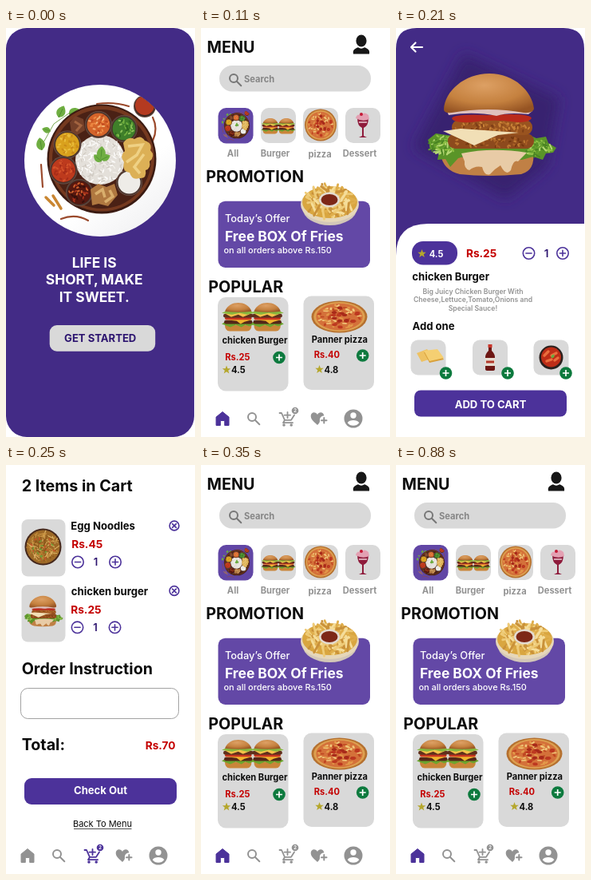
Write an HTML page that moves like this. It is 237 by 512 pixels and loops after 1.2 s.

```html
<!DOCTYPE html>
<html lang="en">
<head>
<meta charset="utf-8">
<title>Food ordering app</title>
<style>
html, body { margin: 0; width: 100%; height: 100%; overflow: hidden; background: #fff; }
svg { display: block; }
text { font-family: Inter, sans-serif; font-weight: 700; fill: #0b0b0b; }
.h1 { font-size: 19.7px; }
.h2 { font-size: 17.4px; }
.h3 { font-size: 13.1px; }
.price { font-size: 13.7px; }
.body { font-size: 11.1px; }
.note { font-size: 8.65px; font-weight: 600; }
.note text { font-weight: 600; }
.mid { text-anchor: middle; }
.grey { fill: #929292; }
.white { fill: #fff; }
.red { fill: #c40000; }
.ink { fill: #2c146f; }
.tile { fill: #d9d9d9; }
.purple { fill: #4c329a; }
.line { fill: none; stroke: currentColor; stroke-width: 1.6; stroke-linecap: round; stroke-linejoin: round; }

.screen { opacity: 0; animation: 1.2s step-end infinite; }
#splash { animation-name: splash; }
#menu { animation-name: menu; }
#detail { animation-name: detail; }
#cart { animation-name: cart; }
@keyframes splash { 0% { opacity: 1 } 4.166% { opacity: 0 } }
@keyframes menu { 0% { opacity: 0 } 4.166% { opacity: 1 } 12.5% { opacity: 0 } 29.166% { opacity: 1 } 100% { opacity: 1 } }
@keyframes detail { 0% { opacity: 0 } 12.5% { opacity: 1 } 20.833% { opacity: 0 } }
@keyframes cart { 0% { opacity: 0 } 20.833% { opacity: 1 } 29.166% { opacity: 0 } }
</style>
</head>
<body>
<svg width="237" height="512" viewBox="0 0 237 512">
<defs>
  <linearGradient id="plateLight" x1=".2" y1=".1" x2=".9" y2="1">
    <stop offset=".6" stop-color="#fff"/><stop offset="1" stop-color="#eeeef0"/>
  </linearGradient>
  <radialGradient id="bun" cx=".45" cy=".3" r=".75">
    <stop offset="0" stop-color="#dda064"/><stop offset=".6" stop-color="#c5813f"/><stop offset="1" stop-color="#965423"/>
  </radialGradient>
  <radialGradient id="bowl"><stop offset=".8" stop-color="#2c1712"/><stop offset="1" stop-color="#6b5248"/></radialGradient>
  <filter id="soft" x="-20%" y="-20%" width="140%" height="140%"><feGaussianBlur stdDeviation="8"/></filter>
  <clipPath id="plateEdge"><circle cx="118" cy="166" r="95"/></clipPath>

  <!-- icons, centred on 0,0 -->
  <path id="star" d="M0-5.4 1.4-1.8 5.2-1.7 2.2.7 3.3 4.4 0 2.2-3.3 4.4-2.2.7-5.2-1.7-1.4-1.8Z" fill="#b5a72c"/>
  <g id="add"><circle r="7.8" fill="#0d7a3e"/><path d="M-4 0H4M0-4V4" stroke="#fff" stroke-width="1.7"/></g>
  <g id="minus" class="line"><circle r="7.2"/><path d="M-3.6 0H3.6"/></g>
  <g id="plus" class="line"><circle r="7.2"/><path d="M-3.6 0H3.6M0-3.6V3.6"/></g>
  <g id="close" class="line"><circle r="5.9"/><path d="M-2.4-2.4 2.4 2.4M2.4-2.4-2.4 2.4"/></g>
  <g id="lens" class="line" style="stroke-width:2"><circle cx="-2" cy="-2" r="5"/><path d="M2 2 7.3 7.3"/></g>
  <path id="home" d="M0-8.5 8-2V8.5H2.7V2.5H-2.7V8.5H-8V-2Z" fill="currentColor" stroke="currentColor" stroke-linejoin="round"/>
  <g id="trolley">
    <path class="line" style="stroke-width:1.8" d="M-9.5-7H-7L-3 1.8H5L9-4.5M-3 1.8-5 5.2H7M-3.5-4.3H4M.5-8V-.8"/>
    <circle cx="-4" cy="8" r="1.8" fill="currentColor"/><circle cx="5.2" cy="8" r="1.8" fill="currentColor"/>
    <circle cx="10" cy="-10" r="4.3" fill="currentColor"/>
    <text class="white mid" x="10" y="-7.9" font-size="5.8">2</text>
  </g>
  <g id="heart">
    <path d="M-2 8C-8 2.7-10.3.4-10.3-3.2-10.3-8.2-4.3-9.2-2-5-.2-9 6-8.4 6.3-3.4 3 -3.6 .6-1 1 2.4 1.1 4 .2 6-2 8Z" fill="currentColor"/>
    <path class="line" style="stroke-width:2" d="M3 2.2H9.5M6.3-1V5.4"/>
  </g>
  <g id="account"><circle r="11.5" fill="currentColor"/><circle cy="-4" r="3.7" fill="#fff"/><path d="M-7.3 5.3C-5 .9 5 .9 7.3 5.3 4 10-4 10-7.3 5.3Z" fill="#fff"/></g>
  <g id="nav">
    <use href="#lens" x="66" y="489"/><use href="#heart" x="148" y="489"/><use href="#account" x="191" y="489"/>
  </g>

  <!-- dishes -->
  <g id="leaf"><path d="M0 0C-8-3-7-11 0-16 7-10 7-4 0 0Z" fill="#6fae42"/><path d="M0 0V-12" stroke="#4a8a2e" stroke-width=".8"/></g>
  <g id="thali" clip-path="url(#plateEdge)">
    <use href="#leaf" transform="translate(45 153) rotate(-10)"/><use href="#leaf" transform="translate(66 112) rotate(25)"/>
    <use href="#leaf" transform="translate(56 129) rotate(-75) scale(.7)"/><use href="#leaf" transform="translate(79 108) rotate(65) scale(.9)"/>
    <path d="M46 145 60 120 80 106" fill="none" stroke="#79a851"/>
    <g fill="none" stroke="#9b4a2c" stroke-width="2.2" stroke-linecap="round">
      <path d="M114 95Q135 92 154 98M184 112Q191 126 184 141M44 171 46 199M69 239Q87 232 103 241"/>
      <path d="M50 212 60 222M59 210 69 226" stroke="#c98632" stroke-width="3.5"/>
    </g>
    <circle cx="174" cy="98" r="14" fill="url(#bowl)"/><circle cx="174" cy="97" r="12" fill="#b43a20"/>
    <circle cx="120" cy="164" r="68.5" fill="#3b1b12"/><circle cx="120" cy="163.5" r="66" fill="#75391f"/><circle cx="120" cy="164" r="62" fill="#4a2115"/>
    <g id="rice"><circle cx="118" cy="165" r="31" fill="#e4e0da"/></g>
    <use href="#leaf" transform="translate(120 167) rotate(-50) scale(.8)"/><use href="#leaf" transform="translate(119 164) rotate(5)"/><use href="#leaf" transform="translate(119 165) rotate(65) scale(.8)"/>
    <g id="curries"></g>
    <path d="M147 144Q153 135 161 139 169 133 174 141 184 144 181 153 188 160 180 167 182 176 175 178 177 189 167 188 158 191 155 181 145 180 148 168 142 160 149 154Z" fill="#dcb056"/>
    <path d="M153 148 171 146 164 159 151 168M173 158 161 174 168 182" fill="none" stroke="#efd184" stroke-width="3.5"/>
    <path d="M106 202 116 195 126 199 136 195 140 209 128 223 116 220 108 222Z" fill="#b07840"/>
    <path d="M112 208 121 202 124 212M130 203 134 211 124 218" fill="none" stroke="#d9ae6c" stroke-width="3.5"/>
    <path d="M80 118 87 110 97 114 99 128 89 134 82 130Z" fill="#744029"/><path d="M86 117 94 122 88 129" fill="none" stroke="#a2633f" stroke-width="3"/>
  </g>
  <g id="bigBurger">
    <path d="M56 158Q114 168 172 155Q175 178 157 183Q115 187 80 183Q59 178 56 158Z" fill="#c08045"/>
    <path d="M40 140 50 132 70 135 165 133 176 138 188 136 191 144 201 150 197 156 188 157 184 165 172 161 158 165 128 164 92 159 78 163 68 174 62 164 52 165 54 155 44 152Z" fill="#5a9428"/>
    <g id="lettuce"></g>
    <rect x="65" y="132" width="108" height="19" rx="9" fill="#8d4a1d"/>
    <path d="M82 157Q120 149 164 156L153 167Q147 164 144 178 138 186 131 172 124 176 118 183 111 186 108 174 99 172 92 178 85 176 86 167Z" fill="#e8cba6"/>
    <rect x="70" y="115" width="101" height="19" rx="9" fill="#99531f"/>
    <g id="crumbs"></g>
    <path d="M59 129 81 126 154 131 128 134 98 147Z" fill="#f1dfb6"/>
    <path d="M70 113Q72 107 119 109 168 106 170 113 166 120 144 117 119 114 94 118 72 119 70 113Z" fill="#b92a1c"/>
    <path d="M64 104Q117 95 171 104L166 108Q140 105 126 110 98 104 66 109Z" fill="#dfc0bd"/>
    <path d="M60 102C61 79 86 57 117 57 149 57 171 80 173 101Q172 107 160 106 116 98 70 106 60 107 60 102Z" fill="url(#bun)"/>
  </g>
  <g id="burger">
    <path d="M3 28H37Q37 36 31 36H9Q3 36 3 28Z" fill="#c98539"/>
    <path d="M-1 27 5 23H35L41 27 34 30 29 28 24 31 17 28 10 31Z" fill="#6ba52e"/>
    <rect x="2" y="22" width="36" height="5" rx="2.5" fill="#552718"/><path d="M1 21H39L28 24 23 27 18 23Z" fill="#f0b42d"/>
    <rect x="3" y="18" width="34" height="3.5" rx="1.7" fill="#c93620"/>
    <rect x="1" y="14" width="38" height="5" rx="2.5" fill="#60301d"/><path d="M2 13H38L31 16 26 18 20 15 11 18Z" fill="#f4c34a"/>
    <path d="M-1 13 6 10H34L41 13 31 15 22 13 12 15Z" fill="#86b83f"/>
    <path d="M3 11C6 3 13 0 20 0S34 3 37 11Q20 13 3 11Z" fill="url(#bun)"/>
  </g>
  <g id="twin"><use href="#burger" x="37"/><use href="#burger"/></g>
  <g id="pizza"><circle r="20" fill="#b5702f"/><circle r="18.4" fill="#dda050"/><circle r="16.7" fill="#d4713a"/></g>
  <g id="fries"><ellipse cx="161.5" cy="226" rx="34" ry="21" fill="#d3c7b8"/><ellipse cx="161.5" cy="221" rx="36.5" ry="22" fill="#e6d7b9"/><ellipse cx="161.5" cy="218" rx="34.5" ry="20" fill="#d9a640"/></g>
  <g id="noodles"><circle r="23" fill="#45281c"/><circle r="21" fill="#9d6927"/></g>
</defs>

<g id="splash" class="screen">
  <rect width="236" height="512" rx="26" fill="#432b86"/>
  <circle cx="118" cy="166" r="95" fill="url(#plateLight)"/>
  <use href="#thali"/>
  <g class="h2 mid"><text class="white" x="110.7" y="300">LIFE IS</text><text class="white" x="110.7" y="321.3">SHORT, MAKE</text><text class="white" x="110.7" y="342.7">IT SWEET.</text></g>
  <rect class="tile" x="54.7" y="372" width="132.5" height="32.7" rx="9"/>
  <text class="h3 ink mid" x="118.2" y="392.7">GET STARTED</text>
</g>

<g id="menu" class="screen">
  <text class="h1" x="7.6" y="31">MENU</text>
  <g fill="#171717"><ellipse cx="201" cy="16" rx="6.6" ry="7.6"/><path d="M191 32.5C190 27 193 26 197 24.3Q201 27 205 24.3C209 26 212 27 211 32.5Z"/></g>
  <rect class="tile" x="23" y="47" width="190" height="32.5" rx="16"/>
  <use href="#lens" x="43" y="65" color="#777"/>
  <text class="body" x="54" y="68" style="fill:#858585">Search</text>

  <rect x="21.5" y="100" width="44" height="44.5" rx="10" fill="#6146a5"/>
  <use href="#thali" transform="translate(44.5 122.5) scale(.235) translate(-118 -165)"/>
  <g class="tile"><rect x="75" y="100" width="44" height="44" rx="10"/><rect x="128" y="100" width="44" height="44" rx="10"/><rect x="181" y="100" width="44" height="44" rx="10"/></g>
  <use href="#twin" transform="translate(76 113) scale(.545 .54)"/>
  <use href="#pizza" x="150" y="121.5"/>
  <path d="M196 112H210Q210 123 204 125V135L208 137H198L202 135V125Q196 123 196 112Z" fill="#8f1c3c"/>
  <path d="M194 113Q195 107 201 109Q205 104 210 109L211 114Q203 118 194 113Z" fill="#e3a0b2"/><circle cx="201" cy="108" r="2" fill="#c41835"/><path d="M198 118H208" stroke="#e9c3cd" stroke-width="1.6"/>
  <g class="body mid"><text class="grey" x="40" y="161">All</text><text class="grey" x="93" y="161">Burger</text><text class="grey" x="149" y="162">pizza</text><text class="grey" x="199" y="161">Dessert</text></g>

  <text class="h1" x="6.3" y="193">PROMOTION</text>
  <rect x="21.5" y="216.7" width="190.5" height="83.3" rx="9" fill="#6348a6"/>
  <use href="#fries"/>
  <text class="white" x="30" y="243" font-size="12.8" style="font-weight:500">Today’s Offer</text>
  <text class="h2 white" x="30" y="267">Free BOX Of Fries</text>
  <text class="white" x="28.5" y="282" font-size="10.9" style="font-weight:500">on all orders above Rs.150</text>

  <text class="h1" x="9.3" y="331">POPULAR</text>
  <rect class="tile" x="21" y="337" width="88.5" height="117.5" rx="10"/>
  <rect class="tile" x="128.5" y="335.5" width="88.5" height="117.5" rx="10"/>
  <use href="#twin" transform="translate(27 344) scale(.985)"/>
  <use href="#pizza" transform="translate(173.5 361.5) scale(1.75 1)"/>
  <text class="body" x="26.5" y="395">chicken Burger</text><text class="body" x="138.8" y="394">Panner pizza</text>
  <text class="body red" x="30.3" y="415.5">Rs.25</text><text class="body red" x="141.7" y="413">Rs.40</text>
  <use href="#add" x="98" y="412.5"/><use href="#add" x="202.7" y="410"/>
  <use href="#star" x="32" y="428"/><use href="#star" x="148.5" y="427.5"/>
  <text class="body" x="37.9" y="432">4.5</text><text class="body" x="154.5" y="431.5">4.8</text>
  <g color="#929292"><use href="#home" x="27" y="489" color="#4c329a"/><use href="#trolley" x="108" y="489"/><use href="#nav"/></g>
</g>

<g id="detail" class="screen">
  <path d="M0 290V26Q0 0 26 0H210Q236 0 236 26V290Z" fill="#432b86"/>
  <path d="M85 32 205 88 190 172 138 214 22 150Z" fill="#39246f" filter="url(#soft)"/>
  <path d="M0 512V285Q0 245 40 245H237V512Z" fill="#fff"/>
  <path class="line" d="M33 24H19M24.5 18.5 19 24 24.5 29.5" style="color:#fff;stroke-width:2.2"/>
  <use href="#bigBurger"/>
  <rect class="purple" x="20" y="267" width="57" height="29.5" rx="14"/>
  <use href="#star" x="32.5" y="282.5"/><text class="body white" x="41.7" y="286.5">4.5</text>
  <text class="red price" x="87.9" y="287">Rs.25</text>
  <g color="#4c329a"><use href="#minus" x="166.5" y="282"/><use href="#plus" x="209" y="282"/></g>
  <text class="ink mid" x="188.5" y="287" font-size="13.5" style="font-weight:600">1</text>
  <text class="h3" x="20.3" y="316">chicken Burger</text>
  <g class="note mid"><text class="grey" x="96.5" y="333">Big Juicy Chicken Burger With</text><text class="grey" x="96.5" y="343.3">Cheese,Lettuce,Tomato,Onions and</text><text class="grey" x="96.5" y="353.7">Special Sauce!</text></g>
  <text class="h3" x="20.5" y="378">Add one</text>
  <g class="tile"><rect x="18.5" y="390.5" width="44" height="44" rx="9"/><rect x="96" y="390.5" width="44" height="44" rx="9"/><rect x="172.5" y="390.5" width="44" height="44" rx="9"/></g>
  <path d="M26 407 39 402 47 413 32 418Z" fill="#eec263"/><path d="M35 406 52 404 60 415 42 419Z" fill="#d9a03a"/><path d="M35 404 52 402 60 413 42 417Z" fill="#f5cf72"/>
  <path d="M116 397H120V404Q124 408 124 412V427Q124 429 121 429H115Q112 429 112 427V412Q112 408 116 404Z" fill="#6d1714"/><rect x="112" y="413" width="12" height="10" fill="#e6ddd1"/><path d="M113 418H123" stroke="#b3382b" stroke-width="3"/><rect x="115.5" y="396" width="5" height="4" fill="#c9362a"/>
  <circle cx="194.5" cy="412.5" r="15" fill="#2b211e"/><circle cx="194.5" cy="412" r="12.5" fill="#bd2d17"/>
  <path d="M186 410 191 405M195 410 201 407M189 417 195 415M199 416 203 413" stroke="#ea6e3d" stroke-width="3.4" stroke-linecap="round"/><use href="#leaf" transform="translate(195 413) rotate(40) scale(.35)"/>
  <use href="#add" x="62.5" y="432"/><use href="#add" x="140" y="432"/><use href="#add" x="213" y="432"/>
  <rect class="purple" x="23" y="453.5" width="191" height="33" rx="8"/>
  <text class="h3 white mid" x="118.5" y="476">ADD TO CART</text>
</g>

<g id="cart" class="screen">
  <text class="h1" x="19.7" y="33">2 Items in Cart</text>
  <rect class="tile" x="19.5" y="68" width="55" height="71.5" rx="8"/><rect class="tile" x="19.5" y="150" width="55" height="71.5" rx="8"/>
  <use href="#noodles" x="46.5" y="102.5"/>
  <use href="#bigBurger" transform="translate(47 183) scale(.3) translate(-119 -121)"/>
  <text class="h3" x="81.3" y="81">Egg Noodles</text><text class="h3" x="81.8" y="163">chicken burger</text>
  <text class="red price" x="82.2" y="104">Rs.45</text><text class="red price" x="81.2" y="186">Rs.25</text>
  <g color="#4c329a">
    <use href="#close" x="211" y="76"/><use href="#close" x="211" y="157.5"/>
    <use href="#minus" x="90" y="121.5"/><use href="#plus" x="137" y="121.5"/><use href="#minus" x="89.5" y="203.3"/><use href="#plus" x="136.5" y="203.3"/>
  </g>
  <text class="ink mid" x="112.5" y="126" font-size="13" style="font-weight:600">1</text><text class="ink mid" x="112" y="208" font-size="13" style="font-weight:600">1</text>
  <text class="h1" x="19.7" y="262">Order Instruction</text>
  <rect x="18.5" y="279.5" width="198" height="38" rx="9" fill="#fff" stroke="#8b8b8b" stroke-width=".8"/>
  <text class="h1" x="19.7" y="357">Total:</text>
  <text class="red price" x="174.7" y="356">Rs.70</text>
  <rect class="purple" x="23" y="392" width="191" height="33" rx="9"/>
  <text class="h3 white mid" x="118.5" y="411.5">Check Out</text>
  <text class="mid" x="121" y="453" font-size="11" style="font-weight:400">Back To Menu</text><path d="M85 455.5H157.5" stroke="#222" stroke-width=".8"/>
  <g color="#929292"><use href="#home" x="27" y="489"/><use href="#trolley" x="108" y="489" color="#4c329a"/><use href="#nav"/></g>
</g>
</svg>
<script>
let seed = 7;
const random = () => (seed = seed * 16807 % 2147483647) / 2147483647;
const draw = (id, markup) => document.getElementById(id).insertAdjacentHTML('beforeend', markup);

// Short strokes strewn over an ellipse.
function strew(id, count, [cx, cy, rx, ry], length, width, colors) {
  let markup = '';
  for (let i = 0; i < count; i++) {
    const turn = random() * 6.283, reach = Math.sqrt(random()), angle = random() * 6.283;
    const x = cx + Math.cos(turn) * reach * rx, y = cy + Math.sin(turn) * reach * ry;
    const dx = Math.cos(angle) * length / 2, dy = Math.sin(angle) * length / 2;
    markup += `<path d="M${x - dx} ${y - dy}L${x + dx} ${y + dy}" stroke="${colors[i % colors.length]}" stroke-width="${width}" stroke-linecap="round"/>`;
  }
  draw(id, markup);
}

function curry(x, y, r, fill, flecks) {
  draw('curries', `<circle cx="${x}" cy="${y}" r="${r}" fill="url(#bowl)"/><circle cx="${x}" cy="${y}" r="${r - 2.5}" fill="${fill}"/>`);
  if (flecks) strew('curries', 32, [x, y, r - 4.5, r - 4.5], 2, 2, flecks);
}

strew('rice', 190, [118, 165, 31, 30], 4, 1.2, ['#fff', '#f4f1ec', '#cfc9c1']);
curry(77, 146, 17.5, '#d9a11d', ['#e9bd3c', '#c98a18']);
curry(72, 178, 17.5, '#bd3a1d', ['#d5532a', '#a62c18']);
curry(92, 206, 17, '#56180f', ['#a6301a', '#d0622d', '#35100b']);
curry(116, 121, 17, '#d4642a', ['#f08b44', '#c24a1f', '#f3b071']);
curry(148, 126, 17, '#3f7f2a', ['#6fae3d', '#2f6a20', '#8cc257']);
curry(154.5, 193.5, 16.5, '#eeece8');
const greens = ['#8fc144', '#4a8423', '#b5d873', '#659f2f'];
strew('lettuce', 50, [58, 147, 15, 12], 6, 2, greens);
strew('lettuce', 50, [178, 151, 18, 9], 6, 2, greens);
strew('crumbs', 90, [119, 125, 48, 8], 2, 2, ['#b46c2b', '#7f3f18', '#c98238']);
strew('crumbs', 70, [119, 143, 50, 7], 2, 2, ['#a85f25', '#74380f', '#bd7932']);
strew('pizza', 60, [0, 0, 15, 15], 2, 1.6, ['#f0c679', '#e39a4a', '#bf4622']);
strew('pizza', 16, [0, 0, 14, 14], .1, 3.6, ['#a82a1a', '#bd3820']);
strew('fries', 120, [161.5, 217, 28, 16], 14, 2.8, ['#eecb78', '#dfae4c', '#f5dd9a', '#c9913a']);
draw('fries', '<ellipse cx="161" cy="215" rx="13" ry="9.5" fill="#e3dbd0"/><ellipse cx="161" cy="215" rx="10.5" ry="7" fill="#7d2717"/>');
strew('noodles', 110, [0, 0, 18, 18], 7, 1.1, ['#c99443', '#ddb468', '#875319', '#b47b2f']);
strew('noodles', 22, [0, 0, 17, 17], 2.5, 1.6, ['#6f9b36', '#c4552a']);
</script>
</body>
</html>
```
